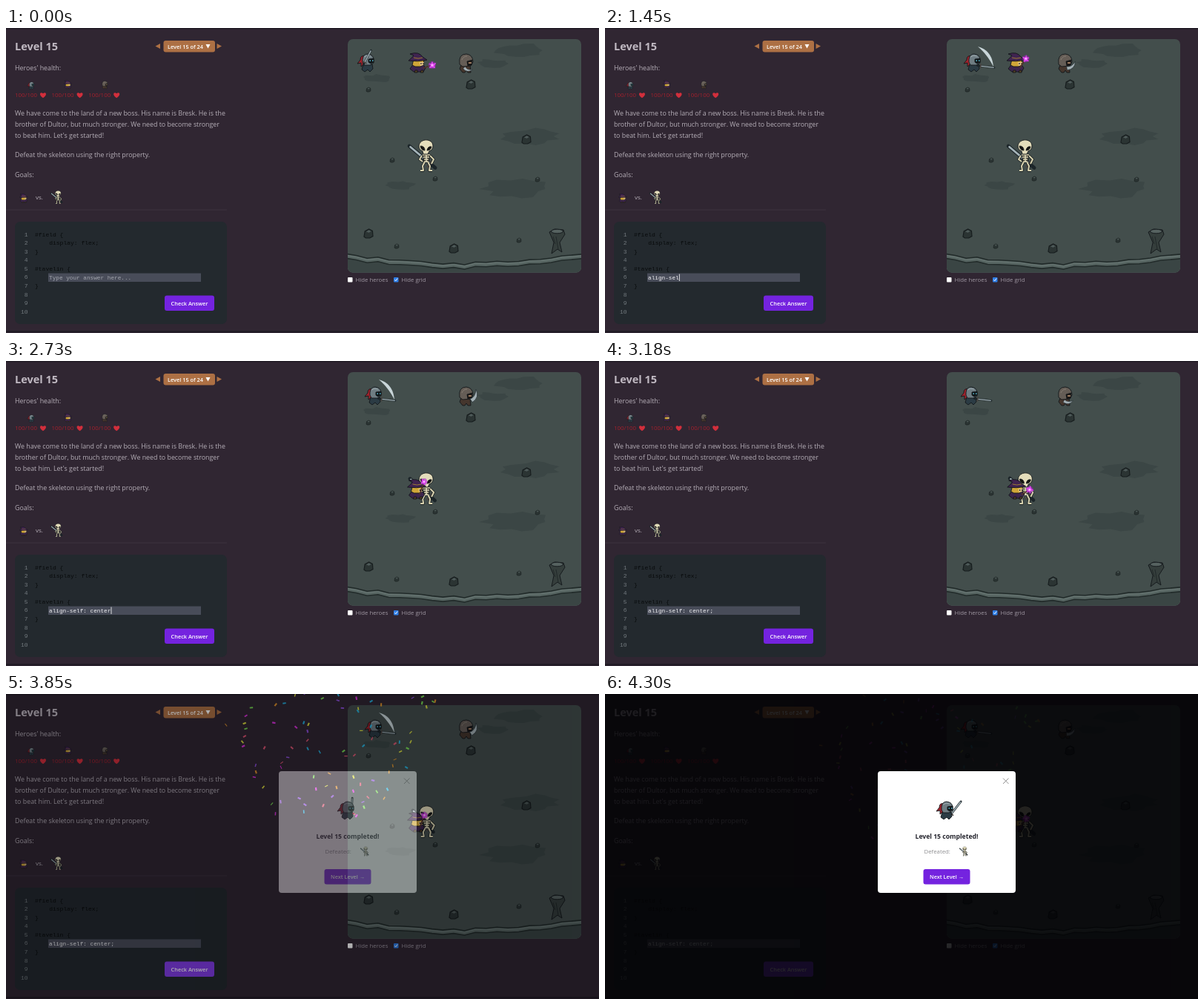
An HTML page for the animation above (4.33 s loop, 800 px wide and 411 px high).

```html
<!DOCTYPE html>
<html lang="en">
<head>
<meta charset="utf-8">
<title>Level 15</title>
<style>
html, body { margin: 0; width: 100%; height: 100%; overflow: hidden; background: #302632; }
svg { display: block; width: 100%; height: 100%; }
text { font: 8.85px "Open Sans", "Noto Sans", sans-serif; fill: #b5aeb7; white-space: pre; }
text.bold { font-weight: 700; }
text.button { font-size: 7.35px; font-weight: 600; fill: #fff; text-anchor: middle; }
text.small { font-size: 7.8px; fill: #9f97a2; }
text.health { font-size: 7.9px; fill: #a5202d; }
text.code { font: 8px "Liberation Mono", "DejaVu Sans Mono", monospace; fill: #080b0c; }
text.number { fill: #737a7f; text-anchor: end; }
text.answer { font-size: 7.72px; fill: #f2f2f5; }
.ink { stroke: #12171a; stroke-width: .9; stroke-linejoin: round; }
.check { animation: press 4330ms infinite; }
.modal { animation: appear 4330ms infinite; }
@keyframes press {
  0%, 77% { fill: #7423df; } 80%, 100% { fill: #823de6; }
}
@keyframes appear {
  0% { opacity: 0; }
  83% { opacity: 0; animation-timing-function: ease-in-out; }
  97%, 100% { opacity: 1; }
}
</style>
</head>
<body>
<svg viewBox="0 0 800 411">
<defs>
  <clipPath id="fieldClip"><rect x="461" y="15" width="315" height="314.5" rx="7"/></clipPath>
  <path id="heart" d="M0 3.8C-7 -.8 -3.4 -5.4 0 -2.2C3.4 -5.4 7 -.8 0 3.8Z" fill="#d12f3c"/>
  <g id="rock">
    <path d="M-1 .7L-.8 -.5L.1 -1L.9 -.6L1 .6L.3 1H-.6Z" fill="#2b3433" stroke="#171d1e" stroke-width=".2"/>
    <path d="M-.5 -.4L.1 -.8L.6 -.5L.1 -.2Z" fill="#4f5b5a"/>
  </g>
  <g id="knight" class="ink">
    <path d="M-2 -5Q-9 -7 -9 0L-13 5L-8 4L-8 9L0 3Z" fill="#a1232d"/>
    <path d="M-5 6H7L8 12L4 16L1 13L-3 16L-7 13Z" fill="#2b3b44"/>
    <path d="M-6 3V-1Q-5 -8 1 -8Q9 -7 9 0V4L4 7H-4Z" fill="#6f7d83"/>
    <path d="M2 -1L9 -2V3L5 5L2 3Z" fill="#101719"/>
    <path d="M3.5 1H5M7 1H8.5" stroke="#5cc3dc" stroke-width="1.5"/>
    <path d="M-4 -4Q0 -7 5 -5" fill="none" stroke="#a4b0b4"/>
  </g>
  <g id="mage" class="ink">
    <path d="M-6 2L-11 9L-6 13H7L10 8L6 2Z" fill="#3d254d"/>
    <path d="M-4 11H-1V14H-5ZM4 11H7V14H3Z" fill="#584025"/>
    <path d="M-8 4L-6 -4H7L8 3L3 6H-4Z" fill="#d0a638"/>
    <path d="M2 0H8L7 4L3 5Z" fill="#e8c98c" stroke="none"/>
    <path d="M4 1V3M7 1V3" stroke-width="1.1"/>
    <path d="M-13 -2Q-8 -6 -6 -9L-11 -11Q1 -15 6 -7L12 -3Q-1 0 -13 -2Z" fill="#402450"/>
    <path d="M-6 -6Q0 -4 6 -6" fill="none" stroke="#a78433"/>
  </g>
  <g id="thief" class="ink">
    <path d="M-6 4L-8 9L-4 14H-1L1 11L3 14H7L6 4Z" fill="#45362d"/>
    <path d="M-8 3Q-10 -11 1 -11Q10 -10 10 0L7 5L-4 6Z" fill="#655d56"/>
    <path d="M2 -1L9 -3L8 4L3 5Z" fill="#1c1715"/>
    <path d="M4 1H8" stroke="#b99474" stroke-width="1.6"/>
    <path d="M-5 -3Q-3 -8 2 -8" fill="none" stroke="#8a8076"/>
  </g>
  <g id="bones" class="ink">
    <path d="M-1 8L-4 14L-3 20H-7M3 8L6 14L5 20H9M-5 0L-8 5L-4 8M6 0L11 5L8 11" fill="none" stroke-width="3.4"/>
    <path d="M-1 8L-4 14L-3 20H-7M3 8L6 14L5 20H9M-5 0L-8 5L-4 8M6 0L11 5L8 11" fill="none" stroke="#d9d3b0" stroke-width="2"/>
    <path d="M-4 -2H6L4 8H-2Z" fill="#3a3930"/>
    <path d="M-4 -1H6M-3 2H5M-2 5H4M-2 8H4M1 -2V9" stroke="#ded8b6" stroke-width="1.6"/>
    <path d="M-9 -12C-9 -24 10 -24 10 -13Q10 -8 5 -6L3 -2H-3L-4 -6Q-9 -8 -9 -12Z" fill="#e4ddbb"/>
    <path d="M-7 -13Q-1 -13 -1 -7Q-6 -7 -7 -13ZM2 -7Q3 -13 8 -12Q7 -7 2 -7Z" fill="#171512"/>
  </g>
  <g id="sword" stroke-linecap="round">
    <path d="M0 3V-23" stroke="#1c2529" stroke-width="2.8"/>
    <path d="M0 -3V-22" stroke="#a5b4b9" stroke-width="1.5"/>
    <path d="M-3 -2H3" stroke="#4b4440" stroke-width="1.6"/>
  </g>
  <g id="skeleton">
    <use href="#sword" transform="translate(9 13) rotate(-50) scale(1.75)"/><use href="#bones"/>
  </g>
</defs>

<rect width="800" height="411" fill="#302632"/>
<path d="M0 .5H800M0 409H800" stroke="#211b25" stroke-width="2"/>
<path d="M0 245H298" stroke="#3c333e"/>

<text class="bold" x="12" y="30" style="font-size:14.5px;fill:#c0b9c2">Level 15</text>
<rect x="212.500" y="17" width="69.500" height="15.500" rx="3" fill="#ad7044"/>
<path d="M208 21V28L201.500 24.500ZM284.500 21V28L291 24.500Z" fill="#ad7044"/>
<text class="button" x="242" y="27.500">Level 15 of 24</text>
<path d="M269.500 22H275.500L272.500 27.500Z" fill="#fff"/>

<text x="12" y="56.500">Heroes' health:</text>
<g id="health"></g>
<text x="12" y="117.500">We have come to the land of a new boss. His name is Bresk. He is the</text>
<text x="12" y="132.500">brother of Dultor, but much stronger. We need to become stronger</text>
<text x="12" y="147.500">to beat him. Let's get started!</text>
<text x="12" y="173.500">Defeat the skeleton using the right property.</text>
<text x="12" y="200.500">Goals:</text>
<use href="#mage" transform="translate(24 229) scale(.45)"/>
<text x="40" y="231" style="font-size:8px">vs.</text>
<use href="#skeleton" transform="translate(70 228) scale(.42)"/>

<rect x="12" y="261" width="286" height="138" rx="7" fill="#23292e"/>
<g id="numbers"></g>
<text class="code" x="39" y="280.500">#field {</text>
<text class="code" x="39" y="292">    display: flex;</text>
<text class="code" x="39" y="303.500">}</text>
<text class="code" x="39" y="326.800">#tavelin {</text>
<text class="code" x="39" y="350">}</text>
<rect x="57" y="330.500" width="206" height="11.500" fill="#484c59"/>
<text id="answer" class="code answer" x="58" y="338.800"></text>
<rect id="caret" y="331.500" width=".8" height="9.500" fill="#fff"/>
<rect class="check" x="214" y="360.500" width="67" height="20.500" rx="3"/>
<text class="button" x="247.500" y="373.700">Check Answer</text>

<g clip-path="url(#fieldClip)">
  <rect x="461" y="15" width="315" height="315" fill="#434e4c"/>
  <g id="patches" fill="#3b4645"></g>
  <g id="rocks"></g>
  <g class="ink">
    <path d="M736 304L739 289L733 275L740 271L752 272L754 278L747 289L750 302L744 298Z" fill="#353e3c"/>
    <ellipse cx="743.500" cy="274" rx="8" ry="2.800" fill="#566260"/>
    <path d="M742 281L745 298M738 281L741 291" fill="none" stroke="#202827"/>
  </g>
  <g id="cliff" stroke="#222b2a" stroke-linejoin="round"></g>
</g>

<g id="knightHero">
  <use href="#knight"/>
  <path id="slash" d="M6 -18Q25 -13 27 9Q18 -8 6 -18Z" fill="#c9d6d9"/>
  <use id="knightSword" href="#sword"/>
</g>
<g id="thiefHero">
  <use href="#thief"/>
  <path id="blade" d="M0 5Q7 2 6 -9Q13 1 4 9Z" fill="#a3b0b5" stroke="#242c30" stroke-width=".7"/>
</g>
<g id="skeletonFoe">
  <use id="boneSword" href="#sword"/><use href="#bones"/>
</g>
<g id="mageHero">
  <use href="#mage"/>
  <path id="staff" stroke="#51322a" stroke-width="1.800"/>
  <g id="glow">
    <circle r="5" fill="#9624b5" opacity=".5"/>
    <path d="M0 -5L1.500 -2L5 -3L3 1L4 4L0 3L-4 4L-2 0L-5 -2L-1.500 -2Z" fill="#dd43ed"/>
    <circle r="1.500" fill="#f9b6ff"/>
  </g>
</g>

<rect x="461" y="336" width="6.500" height="6.500" rx="1" fill="#fff"/>
<text class="small" x="471.500" y="342">Hide heroes</text>
<rect x="523" y="336" width="6.500" height="6.500" rx="1" fill="#2f7ee6"/>
<path d="M524.500 339.200L525.800 340.700L528.200 337.500" fill="none" stroke="#fff"/>
<text class="small" x="533.500" y="342">Hide grid</text>

<g id="confetti"></g>
<g class="modal">
  <rect width="800" height="411" fill="#020204" fill-opacity=".85"/>
  <rect x="368" y="104" width="186" height="164" rx="4" fill="#fff"/>
  <path d="M537 113.500L544.500 121M544.500 113.500L537 121" stroke="#929292"/>
  <g transform="translate(460 153)">
    <use id="prizeSword" href="#sword"/><use href="#knight"/>
  </g>
  <text class="bold" x="461" y="195" text-anchor="middle" style="font-size:8.650px;fill:#22222b">Level 15 completed!</text>
  <text class="small" x="430.500" y="215" style="fill:#8d8d90">Defeated:</text>
  <use href="#skeleton" transform="translate(485 212) scale(.29)"/>
  <rect x="429.500" y="236" width="63" height="20.500" rx="3" fill="#7423df"/>
  <text class="button" x="461" y="249">Next Level →</text>
</g>
</svg>

<script>
const LOOP = 4330, MOVE = 2700, BURST = 3350;
const ANSWER = "align-self: center;";
const $ = id => document.getElementById(id);
const repeat = (n, make) => Array.from({ length: n }, (_, i) => make(i));
const ramp = (t, from, to) => Math.min(1, Math.max(0, (t - from) / (to - from)));
const mix = (a, b, f) => a.map((v, i) => v + (b[i] - v) * f);
// Rises from 0 to 1 and back once per period.
const wave = (t, period) => Math.sin(Math.PI * t / period) ** 2;
const place = (el, x, y, angle = 0, sx = 1, sy = sx) =>
  el.setAttribute("transform", `translate(${x} ${y}) rotate(${angle}) scale(${sx} ${sy})`);

let seed = 23;
const random = () => (seed = (seed * 16807) % 2147483647) / 2147483647;
const jitter = size => (random() - .5) * size;

$("health").innerHTML = ["knight", "mage", "thief"].map((hero, i) => {
  const x = i * 49.6;
  return `<use href="#${hero}" transform="translate(${34 + x} 76) scale(.42)"/>
    <text class="health" x="${12 + x}" y="92.7">100/100</text>
    <use href="#heart" x="${50 + x}" y="90.5"/>`;
}).join("");

$("numbers").innerHTML = repeat(10, i =>
  `<text class="code number" x="29.5" y="${280.5 + i * 11.58}">${i + 1}</text>`).join("");

function patch([x, y, width]) {
  const points = repeat(18, i => {
    const a = i / 18 * 2 * Math.PI, r = width * (1 + jitter(.5));
    return `${x + Math.cos(a) * r} ${y + Math.sin(a) * r * .28}`;
  });
  return `<path d="M${points.join("L")}Z"/>`;
}
$("patches").innerHTML = [[503, 68, 19], [655, 48, 20], [693, 30, 30], [707, 146, 36], [688, 217, 42], [532, 212, 20]]
  .map(patch).join("");

const rocks = (size, spots) => spots.map(([x, y]) =>
  `<use href="#rock" transform="translate(${x} ${y}) scale(${size})"/>`).join("");
$("rocks").innerHTML =
  rocks(6, [[627, 76], [702, 150], [489, 277], [604, 297]]) +
  rocks(3, [[489, 83], [521, 178], [579, 203], [717, 204], [527, 294], [692, 286]]);

// A shallow sagging edge with a pale rim above the dark drop.
function drawCliff() {
  const edge = repeat(23, i => [458 + i * 14.6, 305 + 12 * Math.sin(Math.PI * i / 22) + jitter(4)]);
  const line = drop => "M" + edge.map(([x, y]) => `${x} ${y + drop}`).join("L");
  $("cliff").innerHTML = `
    <path d="${line(0)}V340H458Z" fill="#566461" stroke-width="1.6"/>
    <path d="${line(6)}V340H458Z" fill="#3a4544" stroke-width="1.6"/>
    <path d="${line(2)}" fill="none" stroke="#6b7976"/>`;
}
drawCliff();

const colors = ["#26ccff", "#a25afd", "#ff5e7e", "#88ff5a", "#fcff42", "#ffa62d", "#ff36ff"];
const bits = repeat(95, i => {
  const el = document.createElementNS("http://www.w3.org/2000/svg", "rect");
  for (const [name, value] of Object.entries({ x: -2.2, y: -1.1, width: 4.4, height: 2.2, fill: colors[i % 7] }))
    el.setAttribute(name, value);
  $("confetti").append(el);
  return { el, angle: jitter(1.05), reach: 135 + random() * 200, turn: random() * 360 };
});

function drawAnswer(t) {
  const typed = Math.min(ANSWER.length, Math.max(0, Math.floor((t - 210) / 137)));
  const box = $("answer");
  box.textContent = typed ? ANSWER.slice(0, typed) : "Type your answer here...";
  box.style.fill = typed ? "#f2f2f5" : "#a4a7af";
  $("caret").setAttribute("x", 58.2 + typed * 4.633);
  $("caret").setAttribute("opacity", typed && t < 2950 ? 1 : 0);
}

function drawKnight(t) {
  const p = t % 1150;
  const strike = ramp(p, 255, 290) - ramp(p, 980, 1090);
  const thrust = ramp(p, 570, 630);
  const [x, y, angle] = mix([-4, 5, 28], [8, 8, 97], strike);
  place($("knightHero"), 487 + strike * (10 - 4 * thrust), 43);
  place($("knightSword"), x, y, angle, .88);
  $("slash").setAttribute("opacity", strike * (1 - thrust));
}

function drawMage(t) {
  const raise = wave(t, 820);
  const [x, y] = mix([19, 4], [6, -14], raise);
  place($("mageHero"), 556 - raise * 2, t < MOVE ? 46 : 172);
  $("staff").setAttribute("d", `M${x * .35} 8L${x} ${y}`);
  place($("glow"), x, y, t * .3, 1.05 - raise * .15);
}

function drawOthers(t) {
  place($("thiefHero"), 620, 46);
  place($("blade"), ...mix([3, 6, 90, .7], [8, -2, -20, 1.1], wave(t, 820)));

  const guard = wave(t, 1450);
  place($("skeletonFoe"), 566 + guard, 172);
  place($("boneSword"), ...mix([9, 13, -50, 1.75], [6, 10, -42, 1.5], guard));
  place($("prizeSword"), 6, 10, 3 + 35 * ramp(t, 4020, 4280));
}

function drawConfetti(t) {
  const age = Math.max(0, (t - BURST) / 16.67);
  const spread = 1 - .9 ** age;
  $("confetti").setAttribute("opacity", age && Math.min(1, 1.25 - age / 70));
  for (const { el, angle, reach, turn } of bits) {
    const x = 432 + Math.sin(angle) * reach * spread;
    const y = 245 - Math.cos(angle) * reach * spread + age * 1.4;
    place(el, x, y, turn + age * 5, 1, .45 + .55 * Math.abs(Math.cos(turn + age * .1)));
  }
}

function draw(t) {
  drawAnswer(t);
  const pose = Math.floor(t / 30) * 30;
  drawKnight(pose);
  drawMage(pose);
  drawOthers(pose);
  drawConfetti(t);
}

let start;
function tick(now) {
  start ??= now;
  draw((now - start) % LOOP);
  requestAnimationFrame(tick);
}
draw(0);
requestAnimationFrame(tick);
</script>
</body>
</html>
```
